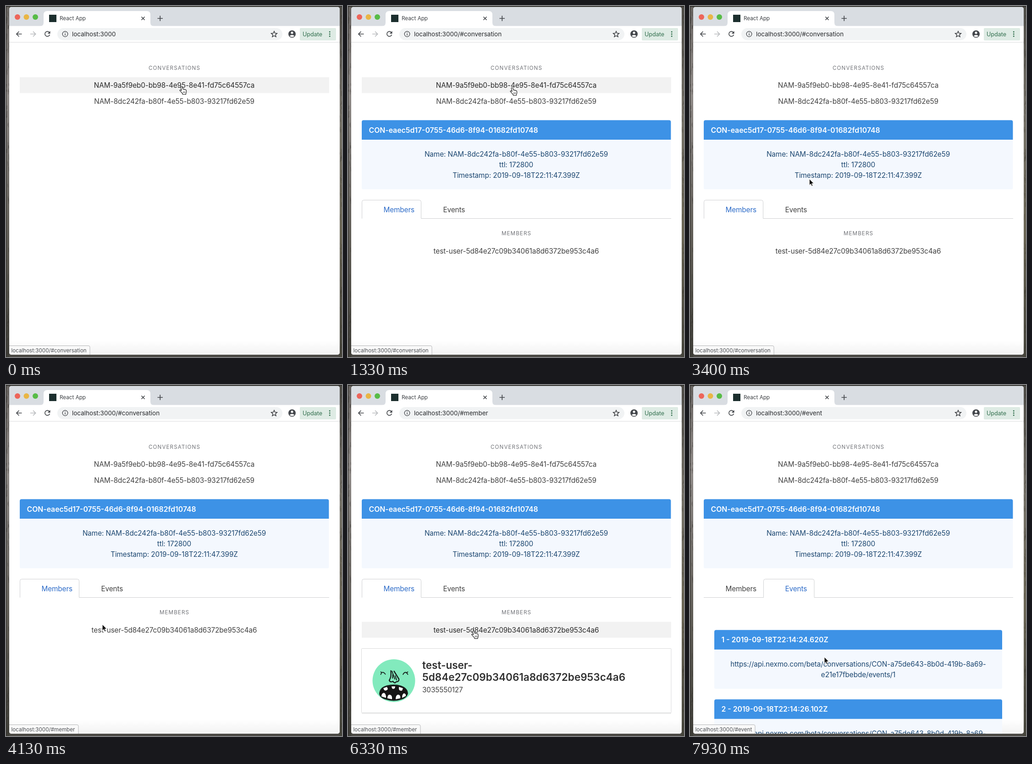
These frames come from a looping animation (733x764 px, 8 s). An HTML page:

```html
<!DOCTYPE html>
<html lang="en">
<head>
<meta charset="utf-8">
<title>Conversation browser</title>
<style>
  html, body { margin: 0; width: 100%; height: 100%; overflow: hidden; background: #6d6963; }
  svg { display: block; width: 733px; height: 764px; }
  text { font-family: Inter, "Open Sans", sans-serif; white-space: pre; }
  .body { font-size: 15.3px; letter-spacing: -.1px; fill: #404040; }
  .mid { text-anchor: middle; }
  .label { font-size: 11.6px; letter-spacing: 1.1px; fill: #707277; text-anchor: middle; }
  .head { font-size: 15.8px; font-weight: 600; fill: #fff; }
  .navy { fill: #1c4770; }
  .title { font-size: 22.5px; font-weight: 600; fill: #303030; }
  .line { fill: none; stroke: #44474b; stroke-width: 1.7; }
</style>
</head>
<body>
<svg viewBox="0 0 733 764">
  <defs>
    <linearGradient id="leftWall" x2="0" y2="1">
      <stop offset="0" stop-color="#686461"/><stop offset=".25" stop-color="#8f8a87"/>
      <stop offset=".42" stop-color="#77736f"/><stop offset=".7" stop-color="#5c5952"/>
      <stop offset="1" stop-color="#3f3e38"/>
    </linearGradient>
    <linearGradient id="rightWall" x2="0" y2="1">
      <stop offset="0" stop-color="#4c4a45"/><stop offset=".3" stop-color="#77736a"/>
      <stop offset=".65" stop-color="#6b6655"/><stop offset="1" stop-color="#45443b"/>
    </linearGradient>
    <linearGradient id="floor" x2="0" y2="1">
      <stop offset="0" stop-color="#fff"/><stop offset="1" stop-color="#f2f2f2"/>
    </linearGradient>
    <clipPath id="window"><rect x="7" y="2" width="721" height="757" rx="5"/></clipPath>
    <clipPath id="face"><circle cx="100" cy="643.5" r="46.5"/></clipPath>
  </defs>

  <rect width="733" height="764" fill="#4b4944"/>
  <rect width="7" height="764" fill="url(#leftWall)"/>
  <rect x="727" width="6" height="764" fill="url(#rightWall)"/>
  <path id="grain" stroke="#2b2a25" stroke-opacity=".35" fill="none"/>
  <rect width="733" height="2" fill="#34332f"/>
  <rect width="1" height="764" fill="#2d2c29"/>

  <g clip-path="url(#window)">
    <rect x="7" y="2" width="721" height="757" fill="#fff"/>
    <rect x="7" y="728" width="721" height="31" fill="url(#floor)"/>

    <rect x="7" y="2" width="721" height="41.5" fill="#d9dde2"/>
    <circle cx="25" cy="24" r="6" fill="#ed655a"/>
    <circle cx="44.5" cy="24" r="6" fill="#e9b645"/>
    <circle cx="64" cy="24" r="6" fill="#58bc47"/>
    <path d="M74 44Q82 44 82 36V19Q82 11 90 11H307Q315 11 315 19V36Q315 44 323 44Z" fill="#fff"/>
    <rect x="94" y="19" width="16" height="16" fill="#1c2f2e"/>
    <text x="117" y="31" font-size="11.7" fill="#3b3e42">React App</text>
    <path class="line" d="M295.5 23.5l7 7m0-7l-7 7M330.5 27h11.5m-5.75-5.75v11.5"/>

    <path class="line" d="M34.5 61H23m5.4-5.5L22.9 61l5.5 5.5"/>
    <path class="line" style="stroke:#b9bbbe" d="M53 61h11.5m-5.4-5.5L64.6 61l-5.5 5.5"/>
    <path class="line" d="M94.3 57.2A5.4 5.4 0 1 0 95.4 62.5"/>
    <path d="M96.5 54.5V60.3H90.7Z" fill="#44474b"/>
    <rect x="112" y="48" width="491" height="26.5" rx="13.25" fill="#f1f3f4"/>
    <circle class="line" style="stroke-width:1.3" cx="129" cy="61" r="5.8"/>
    <path class="line" style="stroke-width:1.4" d="M129 60.3v3.9M129 57.6v1.4"/>
    <text id="address" x="144" y="66" font-size="13.5" fill="#26282b"></text>
    <path class="line" style="stroke:#303236;stroke-width:1.4" d="M585 55l1.8 4.2 4.6.4-3.5 3 1.1 4.5-4-2.4-4 2.4 1.1-4.5-3.5-3 4.6-.4Z"/>
    <circle cx="624" cy="61" r="8" fill="#45484d"/>
    <circle cx="624" cy="58.3" r="2.5" fill="#fff"/>
    <path d="M618.8 65Q624 60.8 629.2 65Q627.3 67.6 624 67.6T618.8 65Z" fill="#fff"/>
    <rect x="641" y="48" width="79" height="27" rx="2" fill="#deebe4"/>
    <text x="647" y="66" font-size="12.6" fill="#33704f">Update</text>
    <path d="M706.2 56.2v0m0 4.8v0m0 4.8v0" stroke="#33704f" stroke-width="3" stroke-linecap="round"/>
    <path d="M7 79H728" stroke="#d8d9db"/>

    <text class="label" x="367.5" y="138.5">CONVERSATIONS</text>
    <g id="rows"></g>

    <g id="details">
      <g id="summary"></g>
      <rect id="eventsHover" x="160" y="423" width="111" height="39" rx="3" fill="#f0f0f0"/>
      <path id="tabLine" fill="none" stroke="#cfd0d2"/>
      <text id="membersTab" class="body" x="77.5" y="448.5">Members</text>
      <text id="eventsTab" class="body" x="207.5" y="448.5">Events</text>
    </g>

    <g id="members">
      <text class="label" x="367.5" y="499">MEMBERS</text>
      <g id="memberRow"></g>
    </g>

    <g id="card">
      <path d="M30 714.3H705" stroke="#e4e4e4" stroke-width="2"/>
      <rect x="29.5" y="573.5" width="675.5" height="140" rx="1" fill="#fff" stroke="#d9dadb"/>
      <circle cx="100" cy="643.5" r="46.5" fill="#82eabd"/>
      <g clip-path="url(#face)" fill="none" stroke="#17211d" stroke-width="1.8" stroke-linecap="round" stroke-linejoin="round">
        <path d="M71.5 630Q75 621 81.5 629.5M74 626l-2.5-1.5M120 630Q125 621 130.5 630M128 626l2.5-1.5"/>
        <path d="M93.500 622Q95 635 90 643Q92 648 98 645Q102 651 105 646Q112 646 111 640L100.500 623" stroke-width="2.4"/>
        <path d="M96 623l6 17M98 629l-1 9M103 633l3 9" stroke-width="2"/>
        <path d="M69 673Q69 659 84 655Q101 651 115 655Q130 660 130 672Q127 681 116 684Q100 689 83 684Q71 681 69 673Z" fill="#151515"/>
        <g fill="#fff" stroke="none">
          <path d="M77 660l8-3 2 5q-4 5-8 2ZM95 656h8l-1 4q-3 3-6 0ZM111 657l9 3-2 5q-5 2-7-3Z"/>
          <path d="M73 678q0-7 5-8 5 1 5 11ZM86 682q0-8 5-8 6 1 5 10ZM104 684q0-9 5-10 6 0 5 8ZM118 681q0-8 4-10 5 1 4 6Z"/>
        </g>
      </g>
      <text class="title" x="162" y="618"></text>
      <text class="title" x="162" y="643.5"></text>
      <text class="body" x="162" y="668.5">3035550127</text>
    </g>

    <g id="events"></g>

    <path id="bubble" fill="#f9f9f9" stroke="#b4b5b7"/>
    <text id="status" x="11.5" y="753.5" font-size="11.6" fill="#4c4f53"></text>
  </g>

  <g id="cursor">
    <path id="arrow" d="M0 0V13.8L3.2 10.9 5.3 15.8 7.7 14.8 5.6 10H9.8Z" fill="#111" stroke="#fff"/>
    <g id="hand" stroke="#222" stroke-width="1.2" stroke-linejoin="round">
      <path fill="#fff" d="M-1.7 1Q-1.5-.5 0-.5Q1.3-.5 1.7 1L3 5Q4.5 4.2 5.3 5.6Q7 4.8 7.8 6.2Q9.8 5.7 10.3 7.6L10.6 11Q10.3 13.5 9.4 14.8V16.5H2.4V15Q0 12.5-1.5 10.4L-3.8 8.2Q-4.3 6.5-2.5 6.6L0 8Z"/>
      <path fill="none" stroke-width=".8" d="M3.6 10v3.5M5.7 10v3.5M7.8 10v3.5"/>
    </g>
  </g>
</svg>

<script>
const LOOP = 8000, STEP = 1000 / 15;
const HOST = 'localhost:3000';
const USER = ['test-user-', '5d84e27c09b34061a8d6372be953c4a6'];
const BUBBLE_WIDTH = { conversation: 183, member: 158, event: 142 };
const $ = id => document.getElementById(id);
const show = (id, on) => $(id).setAttribute('display', on ? 'inline' : 'none');

const text = (cls, x, y, content) => `<text class="${cls}" x="${x}" y="${y}">${content}</text>`;

const row = (id, y, content) =>
  `<rect id="${id}Bg" x="30" y="${y}" width="675" height="34.5" fill="#f2f2f2"/>` +
  `<g id="${id}">${text('body mid', 367, y + 23.3, content)}</g>`;

// Blue-headed box with centred lines below.
const panel = (x, y, width, height, head, lines) =>
  `<rect x="${x}" y="${y + 20}" width="${width}" height="${height - 20}" rx="3" fill="#f4f8fe"/>` +
  `<path d="M${x} ${y + 42.5}v-38.5q0-4 4-4h${width - 8}q4 0 4 4v38.5Z" fill="#3d92e6"/>` +
  text('head', x + 15.5, y + 27, head) +
  lines.map((line, i) => text('body mid navy', 367, y + 79.2 + i * 23.3, line)).join('');

const eventPanel = (number, stamp) =>
  panel(53, 533.3 + (number - 1) * 151, 628, 128, `${number} - ${stamp}`, [
    'https://api.nexmo.com/beta/conversations/CON-a75de643-8b0d-419b-8a69-',
    `e21e17fbebde/events/${number}`
  ]);

$('rows').innerHTML =
  row('first', 155, 'NAM-9a5f9eb0-bb98-4e95-8e41-fd75c64557ca') +
  row('second', 190, 'NAM-8dc242fa-b80f-4e55-b803-93217fd62e59');
$('summary').innerHTML = panel(30, 248.5, 674.4, 150.5, 'CON-eaec5d17-0755-46d6-8f94-01682fd10748', [
  'Name: NAM-8dc242fa-b80f-4e55-b803-93217fd62e59',
  'ttl: 172800',
  'Timestamp: 2019-09-18T22:11:47.399Z'
]);
$('memberRow').innerHTML = row('member', 515.5, USER.join(''));
$('events').innerHTML =
  eventPanel(1, '2019-09-18T22:14:24.620Z') + eventPanel(2, '2019-09-18T22:14:26.102Z');
document.querySelectorAll('.title').forEach((el, i) => { el.textContent = USER[i]; });

// Seeded streaks for the wallpaper showing beside the window.
let seed = 7;
const random = () => (seed = seed * 16807 % 2147483647) / 2147483647;
$('grain').setAttribute('d', Array.from({ length: 120 }, (_, i) =>
  `M${(i % 2 ? 727 : 0) + random() * 6} ${random() * 764}l${random() * 4 - 2} ${4 + random() * 10}`
).join(''));

const smooth = p => p * p * (3 - 2 * p);
const easeIn = p => p * p;
const easeOut = p => p * (2 - p);

// Pointer moves: start, end, destination, easing.
const START = [383, 176];
const MOVES = [
  [667, 1333, [358, 178], smooth],
  [2867, 3667, [226, 446], smooth],
  [3800, 4133, [210, 521], easeIn],
  [4133, 4600, [275, 538], easeOut],
  [6267, 6933, [225, 446], smooth],
  [7533, 7933, [293, 592], smooth]
];

function pointerAt(t) {
  let from = START;
  for (const [start, end, to, ease] of MOVES) {
    if (t < start) break;
    const p = ease(Math.min(1, (t - start) / (end - start)));
    if (p < 1) return from.map((v, i) => v + (to[i] - v) * p);
    from = to;
  }
  return from;
}

function hoverAt([x, y], membersOpen) {
  if (y >= 155 && y < 190) return 'first';
  if (y >= 190 && y < 225) return 'second';
  if (y >= 423 && y < 463 && x > 160 && x < 271) return 'events';
  if (membersOpen && y >= 516 && y < 551) return 'member';
  return '';
}

// Value of the last entry whose time has been reached.
const latest = (t, list) => list.filter(([time]) => t >= time).pop()[1];

function render(t) {
  const opened = t >= 600, onEvents = t >= 7195;
  const membersOpen = opened && !onEvents;
  const hover = hoverAt(pointerAt(Math.max(0, t - STEP)), membersOpen);

  $('address').textContent = HOST + latest(t, [
    [0, ''], [600, '/#conversation'], [4795, '/#member'], [7195, '/#event']
  ]);
  const link = latest(t, [
    [0, 'conversation'], [3595, 'event'], [4060, 'member'], [6795, 'event']
  ]);
  $('status').textContent = `${HOST}/#${link}`;
  $('bubble').setAttribute('d', `M6 739.5H${BUBBLE_WIDTH[link] - 3}q3 0 3 3V760H6Z`);

  for (const id of ['first', 'second', 'member']) {
    show(id + 'Bg', hover === id);
    $(id).firstChild.style.fill = hover === id ? '#282828' : '#404040';
  }
  show('details', opened);
  show('members', membersOpen);
  show('card', t >= 4795 && !onEvents);
  show('events', t >= 7328);
  show('eventsHover', hover === 'events' && !onEvents);
  $('membersTab').style.fill = onEvents ? '#404040' : '#2c6bc8';
  $('eventsTab').style.fill = onEvents ? '#2c6bc8' : '#404040';
  const [left, right] = onEvents ? [160.5, 271] : [30.5, 159.5];
  $('tabLine').setAttribute('d',
    `M30 462.5H${left}V426.5q0-4 4-4H${right - 4}q4 0 4 4V462.5H705`);

  const [x, y] = pointerAt(t);
  $('cursor').setAttribute('transform', `translate(${x} ${y})`);
  show('hand', hover);
  show('arrow', !hover);
}

function tick() {
  const t = performance.now() % LOOP;
  render(Math.floor((t + 5) / STEP) * STEP + .01);
  requestAnimationFrame(tick);
}
tick();
</script>
</body>
</html>
```
